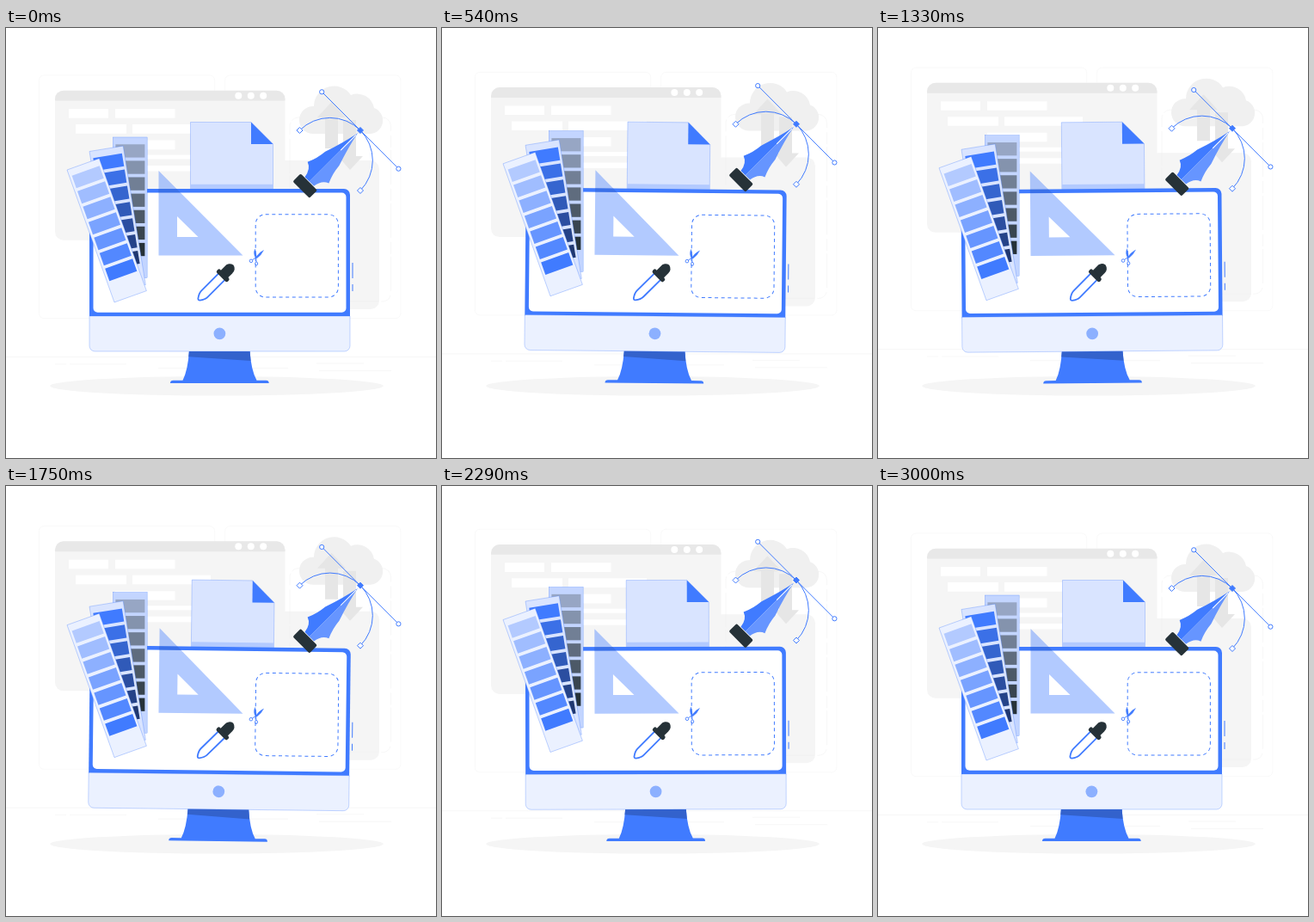
An HTML page that plays this animation: 500x500 px, repeating every 3.04 s.

```html
<!DOCTYPE html>
<html lang="en">
<head>
<meta charset="utf-8">
<title>Design tools</title>
<style>
  html, body { margin: 0; width: 100%; height: 100%; overflow: hidden; background: #fff; }
  svg { display: block; width: 100%; height: 100%; }
</style>
</head>
<body>
<svg viewBox="0 0 500 500" fill="none">
  <g id="backdrop">
    <g stroke="#ebebeb" stroke-width=".3">
      <rect x="38.4" y="55" width="204.2" height="282.6" rx="5.6"/>
      <rect x="254.7" y="55" width="204.2" height="282.6" rx="5.6"/>
      <path stroke-width=".4" d="M0 382.5H500M361 390H416M364 398.5H448M177 395.5H328M57 390.9H70M74 390.9H140"/>
    </g>
    <rect x="310" y="154" width="124" height="173" rx="10" fill="#f5f5f5"/>
    <rect x="330" y="104" width="117.5" height="214" rx="10" stroke="#ebebeb" stroke-width=".4" stroke-dasharray="14 3 40 5"/>

    <rect x="57" y="72.7" width="267.5" height="174" rx="10" fill="#f5f5f5"/>
    <path d="M57 84.5V82.7a10 10 0 0 1 10-10H314.5a10 10 0 0 1 10 10V84.5Z" fill="#e8e8e8"/>
    <g fill="#fff">
      <circle cx="270.3" cy="78.7" r="4"/>
      <circle cx="284.8" cy="78.7" r="4"/>
      <circle cx="299.2" cy="78.7" r="4"/>
      <path d="M73 94h46v10.7h-46zM127 94h69.5v10.7h-69.5zM81 112h59v10.7h-59zM147 112h91v10.7h-91zM127 130.5h69.5v10.7h-69.5zM127 147.5h111v5h-111zM127 160h111v6.5h-111z"/>
    </g>

    <path d="M357 123a16 16 0 0 1 0-32h1a23.5 23.5 0 0 1 43-13a20 20 0 0 1 27 15a15.5 15.5 0 0 1-4 30Z" fill="#f0f0f0"/>
    <path d="M378.5 86L395 104H386V140H371V104H362ZM392 107H407V149H415L400 165L386 149H392Z" fill="#e6e6e6"/>
  </g>

  <ellipse cx="245" cy="416.3" rx="193.9" ry="11.3" fill="#f5f5f5"/>

  <g id="monitor">
    <path d="M214.5 109.5H285L310.5 135V190H214.5Z" fill="#d9e4ff" stroke="#407bff" stroke-width=".3"/>
    <path d="M214.5 181.7H310.5V188H214.5Z" fill="#b3caff"/>
    <path d="M285 109.5V135H310.5Z" fill="#407bff"/>

    <path d="M213 375H283.5Q285 398 291.5 409.7H302.5Q305.7 409.7 305.7 413H191Q191 409.7 194.5 409.7H205.5Q211.5 398 213 375Z" fill="#407bff"/>
    <path d="M213 375H283.5L284.5 387L212.3 382.3Z" fill="#3362cc"/>
    <path d="M97 336V194a7 7 0 0 1 7-7H393a7 7 0 0 1 7 7V336Z" fill="#407bff"/>
    <rect x="101.5" y="191.5" width="294" height="139.3" rx="5" fill="#fff"/>
    <path d="M97 335H400V369.5a6.5 6.5 0 0 1-6.5 6.5H103.5a6.5 6.5 0 0 1-6.5-6.5Z" fill="#ebf1ff" stroke="#407bff" stroke-width=".3"/>
    <circle cx="248.4" cy="355.3" r="6.9" fill="#8cb0ff"/>
    <path d="M403 273V291M403 298V306" stroke="#407bff"/>

    <path d="M177.5 187H198.3L202.8 191.5H177.5Z" fill="#000" fill-opacity=".15"/>
    <path d="M177.5 166V264.5H275.5ZM199 219L223.5 243H199Z" fill="#407bff" fill-opacity=".4" fill-rule="evenodd"/>

    <rect x="290.2" y="216.8" width="96.2" height="96.2" rx="11.5" stroke="#407bff" stroke-dasharray="4 3.6"/>
    <g stroke="#407bff" stroke-width=".9">
      <path d="M289.6 257Q287 262 290.5 268L291.4 266Z" fill="#407bff" stroke-width=".4"/>
      <path d="M299.5 258.5Q293 262 290.5 267.3L292 267.6Q297 264 299.5 258.5Z" fill="#407bff" stroke-width=".4"/>
      <path d="M291.4 266.5L286.5 269.6M290.7 267L291 272"/>
      <circle cx="285" cy="270.8" r="1.8"/>
      <ellipse cx="291.2" cy="274" rx="1.5" ry="2"/>
    </g>

    <g transform="translate(252 288) rotate(135)">
      <path d="M0-5.2H30Q34-5.2 39-1.5Q40.5 0 39 1.5Q34 5.2 30 5.2H0Z" fill="#fff" stroke="#407bff" stroke-width="1.8"/>
      <path d="M-2-4.5H-10a5.5 5.5 0 0 0-6 4.5a5.5 5.5 0 0 0 6 4.5H-2Z" fill="#263238" stroke="#263238" stroke-width="3"/>
      <rect x="-3" y="-9" width="5.5" height="18" rx="2.3" fill="#263238"/>
    </g>
  </g>

  <g id="fan"></g>

  <g id="pen">
    <g stroke="#407bff">
      <path d="M367 74L456.5 163.7M341.5 119A49.9 49.9 0 0 1 412 119A49.9 49.9 0 0 1 412 189"/>
      <g fill="#fff">
        <circle cx="367.2" cy="74.3" r="2.6"/>
        <circle cx="456.4" cy="163.7" r="2.6"/>
        <path d="M341.5 115.5l3.5 3.5l-3.5 3.5l-3.5-3.5zM412 185.5l3.5 3.5l-3.5 3.5l-3.5-3.5z"/>
      </g>
      <path d="M412 115.5l3.5 3.5l-3.5 3.5l-3.5-3.5z" fill="#407bff"/>
    </g>
    <g transform="translate(409 122.3) rotate(135)">
      <path id="half" d="M0 0Q20 4 42 11.5Q54 12.5 65 17.5Q68 9 79.5 7.5V0Z" fill="#407bff"/>
      <path d="M0 0Q20-4 42-11.5Q54-12.5 65-17.5Q68-9 79.5-7.5V0Z" fill="#6695ff"/>
      <path d="M3 0H28" stroke="#fff"/>
      <rect x="80.2" y="-13.7" width="13" height="27.4" rx="1.8" fill="#263238"/>
    </g>
  </g>
</svg>
<script>
const el = id => document.getElementById(id);

// One colour strip: a card with seven swatches blending between two colours
function strip(x, y, angle, card, from, to) {
  let parts = `<rect width="39.7" height="163.5" fill="${card}" stroke="#407bff" stroke-width=".3"/>`;
  for (let i = 0; i < 7; i++) {
    const rgb = from.map((c, k) => Math.round(c + (to[k] - c) * i / 6));
    parts += `<rect x="3" y="${8.3 + i * 19.1}" width="34" height="15.3" fill="rgb(${rgb})"/>`;
  }
  return `<g transform="translate(${x} ${y}) rotate(${angle})">${parts}</g>`;
}

el('fan').innerHTML =
  strip(124.4, 127, 0, '#c3d5ff', [151, 166, 196], [38, 50, 56]) +
  strip(97, 143.5, -9.2, '#d9e4ff', [64, 123, 255], [32, 56, 112]) +
  strip(71, 165, -19.65, '#ebf1ff', [179, 202, 255], [64, 123, 255]);

// Linear rise and fall: 0 -> 1 -> 0 over one period
const hill = p => 1 - Math.abs(1 - 2 * (p % 1));
// Linear swing: 0 -> 1 -> -1 -> 0 over one period
const swing = p => 2 * hill(p + 0.25) - 1;
const sway = p => -swing(p + 0.5);

function draw(now) {
  const t = Math.min(now % 3040, 3000);
  const lift = `translate(0 ${-10 * hill(t / 1500)})`;
  el('backdrop').setAttribute('transform', `translate(0 ${-10 * hill(t / 3000)})`);
  el('monitor').setAttribute('transform', `rotate(${sway(t / 1500)} 250 261)`);
  el('fan').setAttribute('transform', lift);
  el('pen').setAttribute('transform', lift);
  requestAnimationFrame(draw);
}
draw(performance.now());
</script>
</body>
</html>
```
